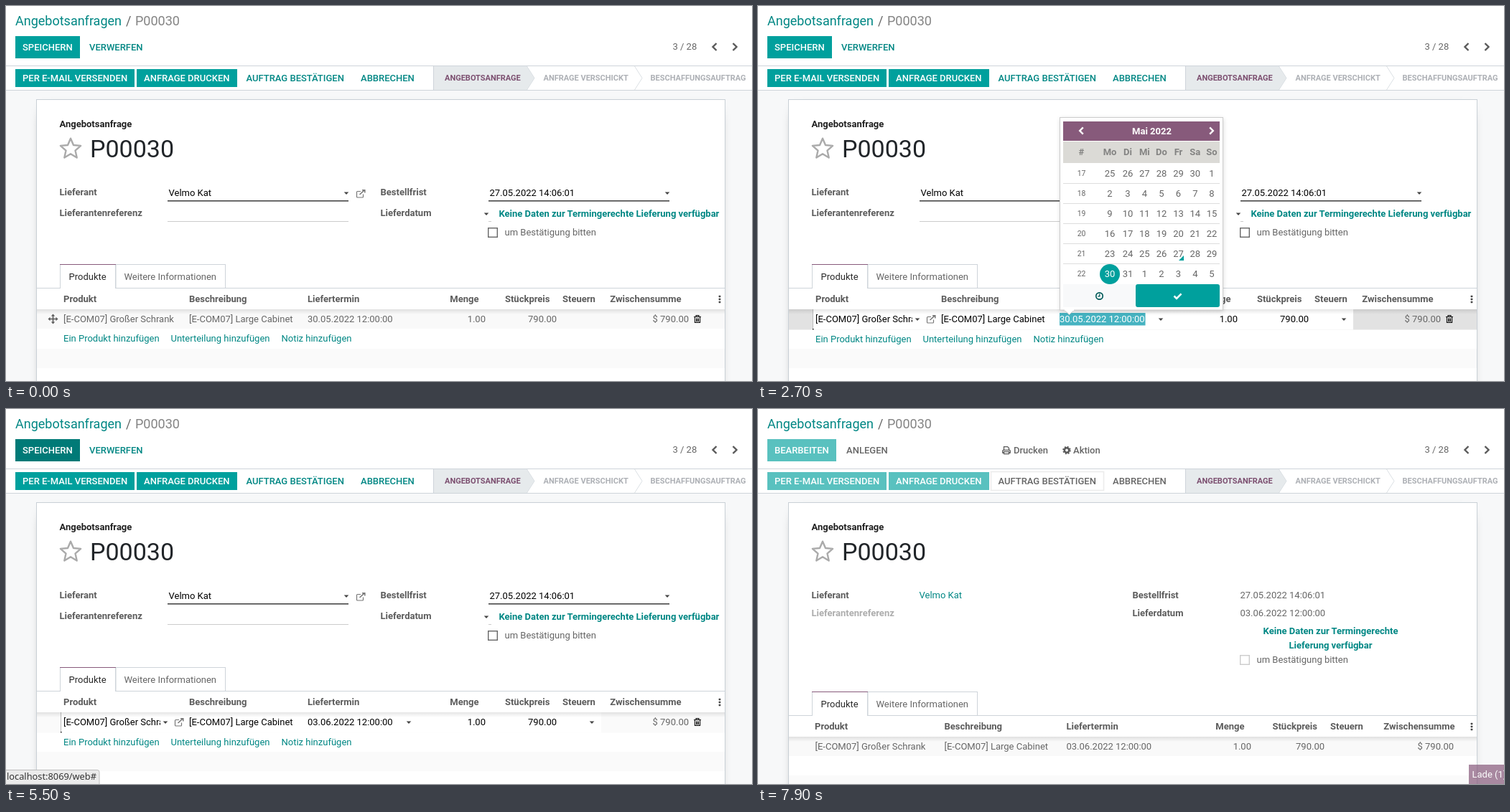
Recreate the animation shown at these times as an HTML page. Size 1039x523 px, loop 8 s.

```html
<!DOCTYPE html>
<html lang="de">
<head>
<meta charset="utf-8">
<title>Angebotsanfrage</title>
<style>
  html, body { margin: 0; width: 100%; height: 100%; overflow: hidden; background: #fff; }
  svg { display: block; }
  text { font: 13px Roboto, sans-serif; fill: #666; white-space: pre; }
  .bold { font-weight: 700; }
  .label { font-weight: 700; fill: #5c5c5c; }
  .btn { font-weight: 500; }
  .end { text-anchor: end; }
  .mid { text-anchor: middle; }
  .link { fill: #008784; }
  .white { fill: #fff; }
  .black { fill: #000; }
  .muted { fill: #adadad; }
  .crumb { font-size: 18px; }
  .title { font-size: 34px; fill: #212529; }
  .stage { font-size: 11px; font-weight: 700; fill: #adb0b5; }
  .active { fill: #7c4f70; }
  .tip { font-size: 11.375px; fill: #484848; }
  .week { font-size: 10.4px; }
  .url { font: 12.8px "Noto Sans", sans-serif; fill: #333; }
</style>
</head>
<body>
<svg id="view" width="1039" height="523" viewBox="0 0 1039 523"></svg>
<script>
const LOOP = 8000;
const TEAL = '#00a09d', DARK = '#007a77', PALE = '#59c1bf', LINE = '#ced4da', GREY = '#5a5a5a', PURPLE = '#875a7b';

// Drawing helpers
const text = (x, y, s, cls = '') => `<text x="${x}" y="${y}" class="${cls}">${s}</text>`;
const rect = (x, y, w, h, fill, more = '') => `<rect x="${x}" y="${y}" width="${w}" height="${h}" fill="${fill}" ${more}/>`;
const frame = (x, y, w, h, color, width = 1, fill = 'none') => rect(x, y, w, h, fill, `stroke="${color}" stroke-width="${width}"`);
const line = (d, color, width = 1, fill = 'none') => `<path d="${d}" stroke="${color}" stroke-width="${width}" fill="${fill}"/>`;
const shape = (d, fill) => `<path d="${d}" fill="${fill}"/>`;
const caret = (x, y) => shape(`M${x - 3.3} ${y - 1.5}h6.6l-3.3 3.4z`, '#444');
const button = (x, y, w, h, s, fill) => rect(x, y, w, h, fill) + text(x + 10, y + h / 2 + 4.5, s, 'btn white');

// Icons
const external = (x, y) =>
  line(`M${x + 6} ${y + 2.5}h-4.5q-1 0-1 1v6.5q0 1 1 1h7q1 0 1-1v-3.5`, '#777', 1.2) +
  line(`M${x + 4.5} ${y + 7}l7-6.4M${x + 8} ${y + .7}h3.8v3.8`, '#777', 1.5);
const chevron = (x, y, dir, color, size = 5) =>
  line(`M${x - dir * size / 2} ${y - size}l${dir * size} ${size}l${-dir * size} ${size}`, color, 2.4);
const trash = (x, y) =>
  line(`M${x} ${y + 2.5}h10M${x + 3} ${y + 2}v-1.4h4v1.4M${x + 1.4} ${y + 3}v7.4h7.2v-7.4M${x + 3.5} ${y + 4.5}v4.5m1.5-4.5v4.5m1.5-4.5v4.5`, '#111', 1.1);
const move = (x, y) =>
  line(`M${x - 5} ${y}h10M${x} ${y - 5}v10`, GREY, 1.6) +
  [0, 90, 180, 270].map(a => `<path d="M0-7l2.7 3h-5.4z" fill="${GREY}" transform="translate(${x} ${y}) rotate(${a})"/>`).join('');
const dots = y => [-4, 0, 4].map(d => rect(992.7, y + d - 1.3, 2.6, 2.6, '#444', 'rx=".6"')).join('');
const printer = (x, y) =>
  line(`M${x + 2.5} ${y + 5}v-4.4h5l2 2v2.4M${x + 2.5} ${y + 9}h-1.8v-2.6q0-1 1-1h8.6q1 0 1 1v2.6h-1.8M${x + 2.5} ${y + 7.6}h7v3h-7z`, GREY, 1.3);
const gear = (x, y) =>
  `<circle cx="${x}" cy="${y}" r="3.2" fill="none" stroke="${GREY}" stroke-width="2.6"/>` +
  `<circle cx="${x}" cy="${y}" r="4.7" fill="none" stroke="${GREY}" stroke-width="2.2" stroke-dasharray="1.85"/>`;
const star = (cx, cy, r) => {
  const points = [...Array(10).keys()].map(i => {
    const a = (i * 36 - 90) * Math.PI / 180, d = i % 2 ? r * .46 : r;
    return `${(cx + d * Math.cos(a)).toFixed(1)},${(cy + d * Math.sin(a)).toFixed(1)}`;
  });
  return `<polygon points="${points.join(' ')}" fill="none" stroke="#aaa" stroke-width="2.4" stroke-linejoin="round"/>`;
};

// Shared page parts
const page = () =>
  rect(0, 118, 1039, 405, '#f7f8f9') +
  rect(57, 150, 929, 600, '#000', 'style="filter:blur(10px)"') +
  frame(42.5, 130.5, 959, 600, '#c9d0d6', 1, '#fff') +
  rect(0, 0, 1039, 118, '#fff') + rect(0, 83, 1039, 1, LINE) + rect(0, 117, 1039, 1, LINE) +
  text(13, 27, 'Angebotsanfragen', 'crumb link') + text(167, 27, '/', 'crumb') +
  `<g opacity=".8">${text(180, 27, 'P00030', 'crumb')}</g>` +
  text(928.5, 61, '3 / 28') + chevron(987, 57, -1, GREY) + chevron(1015, 57, 1, GREY) +
  shape('M595 84H725.5L736 100.5L725.5 117H595z', '#e6eaec') + rect(595, 84, 1, 33, LINE) +
  line('M725.5 84L736 100.5L725.5 117M875.5 84L886 100.5L875.5 117', '#dbe0e4') +
  text(611, 104, 'ANGEBOTSANFRAGE', 'stage active') +
  text(748.5, 104, 'ANFRAGE VERSCHICKT', 'stage') + text(897.5, 104, 'BESCHAFFUNGSAUFTRAG', 'stage') +
  `<g style="filter:brightness(.35)">${text(74.5, 169, 'Angebotsanfrage', 'label')}</g>` +
  star(90, 199.5, 14.8) + text(117, 211, 'P00030', 'title') +
  text(74.5, 264, 'Lieferant', 'label') + text(521.5, 264, 'Bestellfrist', 'label');

const actions = disabled => {
  const fill = disabled ? PALE : TEAL, cls = disabled ? 'btn' : 'btn link';
  return button(13, 88, 166, 25, 'PER E-MAIL VERSENDEN', fill) + button(182, 88, 140, 25, 'ANFRAGE DRUCKEN', fill) +
    text(334.5, 105, 'AUFTRAG BESTÄTIGEN', cls) + text(494, 105, 'ABBRECHEN', cls);
};

const tabs = y =>
  rect(43, y + 33, 958, 1, LINE) + frame(153, y + .5, 152.5, 33, LINE) +
  rect(75, y, 78, 34, '#fff') + line(`M75.5 ${y + 34}V${y}M152.5 ${y}V${y + 34}`, LINE) + rect(75, y, 78, 1, PURPLE) +
  `<g style="filter:brightness(.4)">${text(87.5, y + 22, 'Produkte')}</g>` + text(164.5, y + 22, 'Weitere Informationen');

const head = (y, x) =>
  ['Produkt', 'Beschreibung', 'Liefertermin', 'Menge', 'Stückpreis', 'Steuern', 'Zwischensumme']
    .map((s, i) => text(x[i], y, s, 'label' + ([3, 4, 6].includes(i) ? ' end' : ''))).join('') + dots(y - 4);

const rowShade = y => rect(43, y, 958, 7, 'url(#shade)');
const editColumns = [80, 255, 420, 658.5, 757.5, 775, 940.5];
const addLinks = y =>
  text(80, y, 'Ein Produkt hinzufügen', 'link') + text(229.5, y, 'Unterteilung hinzufügen', 'link') +
  text(383.5, y, 'Notiz hinzufügen', 'link');

const editForm = () =>
  text(116, 62, 'VERWERFEN', 'btn link') +
  text(226.5, 265, 'Velmo Kat', 'black') + rect(225, 271, 252, 1.6, '#484848') + caret(474, 261) + external(488, 256) +
  text(74.5, 293, 'Lieferantenreferenz', 'label') + rect(225, 300, 252, 1, '#ccc') +
  text(673.5, 265, '27.05.2022 14:06:01', 'black') + rect(672, 271, 252, 1.6, '#484848') + caret(921, 261) +
  text(521.5, 293, 'Lieferdatum', 'label') + caret(669, 290) + rect(672, 300, 4, 1, '#ccc') +
  text(686.5, 294, 'Keine Daten zur Termingerechte Lieferung verfügbar', 'bold link') +
  frame(671.7, 309.7, 12.6, 12.6, '#666', 1.4) + text(694.5, 320, 'um Bestätigung bitten') +
  tabs(360) + head(413, editColumns) + rect(43, 478, 958, 27, '#fafafa');

const viewRow = fill =>
  rect(43, 423, 958, 27, fill) + rowShade(423) + move(65.5, 436.5) +
  text(80, 441, '[E-COM07] Großer Schrank') + text(255, 441, '[E-COM07] Large Cabinet') +
  text(420, 441, '30.05.2022 12:00:00') + text(668, 441, '1.00', 'end') + text(767, 441, '790.00', 'end') +
  text(951, 441, '$ 790.00', 'end') + trash(958, 431) + addLinks(468);

const inputRow = fill =>
  rect(43, 423, 958, 28.5, fill) + rect(77, 423, 752, 28.5, '#fff') + rect(76, 423, 1, 28, '#bbb') +
  rect(76, 450, 1.5, 1.5, '#222') + rowShade(423) +
  text(80, 441, '[E-COM07] Großer Schrank', 'black') + rect(215, 430, 22, 18, '#fff') +
  caret(222, 437) + external(235, 431) + text(255, 441, '[E-COM07] Large Cabinet', 'black') +
  caret(561, 437) + text(668, 441, '1.00', 'end black') + text(767, 441, '790.00', 'end black') + caret(816, 437) +
  text(951, 441, '$ 790.00', 'end') + trash(958, 431) + addLinks(469);

const readForm = () =>
  printer(340, 52) + text(356, 62, 'Drucken', 'btn') + gear(430, 57.5) + text(439, 62, 'Aktion', 'btn') +
  text(224.5, 264, 'Velmo Kat', 'link') + text(74.5, 289, 'Lieferantenreferenz', 'bold muted') +
  text(671.5, 264, '27.05.2022 14:06:01') + text(521.5, 289, 'Lieferdatum', 'label') + text(671.5, 289, '03.06.2022 12:00:00') +
  text(797.5, 314, 'Keine Daten zur Termingerechte', 'bold link mid') + text(797.5, 334, 'Lieferung verfügbar', 'bold link mid') +
  frame(671.7, 343.7, 12.6, 12.6, '#ccc', 1.4) + text(694.5, 354, 'um Bestätigung bitten') +
  tabs(394) + head(447, [79, 259.5, 429.5, 677.5, 779, 797, 970.5]) +
  rect(43, 457, 958, 27, '#f9f9f9') + rowShade(457) + rect(43, 511, 958, 12, '#fafafa') +
  text(79.5, 475, '[E-COM07] Großer Schrank') + text(259.5, 475, '[E-COM07] Large Cabinet') +
  text(429.5, 475, '03.06.2022 12:00:00') + text(687, 475, '1.00', 'end') +
  text(789, 475, '790.00', 'end') + text(969, 475, '$ 790.00', 'end');

// Pop-ups
const tooltip = () => {
  const rows = [['Feld', 'order_line'], ['Objekt', 'purchase.order'], ['Typ', 'one2many'],
    ['Widget', 'One2many (section_and_note_one2many)'], ['Kontext', `{'default_state': 'draft'}`], ['Domäne', '[]'],
    ['Modifikatoren', '{"readonly":[["state","in",["done","cancel"]]]}'], ['Bei Änderung', '1'], ['Relation', 'purchase.order.line']];
  return frame(359.5, 167.5, 324.5, 212, '#888', 1, '#fff') +
    line('M517 379.5l5.5 4.5l5.5-4.5', '#888', 1, '#fff') + rect(518, 378.5, 9, 1.4, '#fff') +
    rect(365, 173, 313, 27, '#f4f4f4') + text(373, 190, 'Auftragszeilen', 'tip bold') +
    rows.map(([key, value], i) => {
      const y = Math.round(221 + 17.5 * i);
      return `<circle cx="380" cy="${y - 3.5}" r="1.7" fill="none" stroke="#777" stroke-width=".8"/>` +
        text(388, y, `<tspan class="bold">${key}:</tspan> ${value}`, 'tip');
    }).join('');
};

const dayX = [490, 515, 538.3, 562, 585.5, 608.8, 632];
const cell = (i, fill, r) => {
  const col = i % 7, w = col ? 23.4 : 28;
  return rect(dayX[col] - w / 2, 219.5 + 28 * Math.floor(i / 7) + .5, w, 28, fill, `rx="${r}"`);
};
const calendar = (title, month, first, week, selected) => {
  let s = rect(421, 157, 227, 269, '#000', 'opacity=".16" style="filter:blur(3px)"') +
    line('M426 423.5l7.5 7l7.5-7', '#ccc', 1, '#fff') +
    frame(420.5, 155.5, 227, 268.5, '#ccc', 1, '#fff') + rect(427, 423, 13, 2, '#fff') +
    rect(425, 161, 218, 27, PURPLE) + text(548.5, 179, title, 'bold white mid') +
    chevron(450.5, 174, -1, '#fff', 4.6) + chevron(631.5, 174, 1, '#fff', 4.6) +
    rect(425, 189, 218, 30, '#dbdad6');
  ['#', 'Mo', 'Di', 'Mi', 'Do', 'Fr', 'Sa', 'So'].forEach((d, i) =>
    s += `<g opacity=".75">${text(i ? dayX[i - 1] : 450.5, 208, d, 'bold mid')}</g>`);
  s += cell(selected, TEAL, 14);
  for (let i = 0; i < 42; i++) {
    const row = Math.floor(i / 7), y = 238 + 28 * row;
    if (i % 7 === 0) {
      s += text(450.5, y - 1, week + row, 'week mid');
      if (row) s += rect(425, 219 + 28 * row, 218, 1, '#ddd');
    }
    s += text(dayX[i % 7], y, new Date(2022, month, first + i).getDate(), i === selected ? 'mid white' : 'mid');
  }
  return s;
};
const calendarFoot = (clock, check) =>
  rect(425, 388, 101, 32, '#f8f9fa') + rect(526, 388, 117, 32, check, 'rx="3"') +
  `<circle cx="475.5" cy="404.5" r="4.7" fill="none" stroke="${clock}" stroke-width="1.7"/>` +
  line('M475.8 401.5v3.4h-2.6', clock, 1.3) + line('M579.5 404.5l3.5 3.4l6.5-6.5', '#fff', 2.6);

const statusUrl = () =>
  `<path d="M-1 503.5H127q3 0 3 3V524H-1z" fill="#ebebeb" stroke="#bdbdbd"/>` + text(1, 517, 'localhost:8069/web#', 'url');
const loading = () => rect(990, 496, 49, 27, PURPLE) + text(994.5, 514, 'Lade (1)', 'white');

// Timeline: each layer has a rule giving its opacity at time t
const during = (...spans) => t => +spans.some(([a, b]) => t >= a && t < b);
const keys = (...stops) => t => stops.reduce((value, [at, v]) => t >= at ? v : value, 0);
const saved = 5800;
const layers = [
  [() => 1, page()],
  [during([0, 5600], [saved, 7500]), actions(false)],
  [during([5600, saved], [7500, LOOP]), actions(true)],
  [during([0, saved]), editForm()],
  [during([0, 5400]), button(13, 42, 90, 31, 'SPEICHERN', TEAL)],
  [during([5400, 5600]), button(13, 42, 90, 31, 'SPEICHERN', DARK)],
  [during([5600, saved]), button(13, 42, 90, 31, 'SPEICHERN', PALE)],
  [during([0, 1300]), viewRow('#f9f9f9')],
  [during([1300, 1400]), viewRow('#e2e2e2')],
  [during([1400, 4500]), inputRow('#e2e2e2')],
  [during([4500, saved]), inputRow('#fafafa')],
  [during([1400, 3800]), rect(420, 428, 119.5, 17.5, '#46b3c1') + text(420, 441, '30.05.2022 12:00:00', 'white')],
  [during([3800, saved]), text(420, 441, '03.06.2022 12:00:00', 'black')],
  [during([3800, 4200]), rect(539, 429, 1, 16, '#000')],
  [during([saved, LOOP]), readForm()],
  [during([saved, 7500]), button(13, 42, 96, 31, 'BEARBEITEN', TEAL) + text(123, 62, 'ANLEGEN', 'btn link')],
  [during([7500, LOOP]), button(13, 42, 96, 31, 'BEARBEITEN', PALE) + text(123, 62, 'ANLEGEN', 'btn') +
    frame(324.5, 87.5, 157, 26, '#ececec', 1.6)],
  [during([saved, 7400]), frame(12, 87, 168, 27, '#66c6c4', 2)],
  [keys([6900, .5], [7000, 1], [7500, 0]), rect(325, 88, 156, 25, '#ececec') + text(334.5, 105, 'AUFTRAG BESTÄTIGEN', 'btn link')],
  [keys([1700, .2], [1800, .55], [1900, 1], [2000, .4], [2100, 0]), tooltip()],
  [during([2000, 3800]), calendar('Mai 2022', 3, 25, 17, 35) + shape('M593 348v7h-7z', TEAL)],
  ...[[36, 2800, 2900], [37, 2900, 3000], [38, 3000, 3500], [39, 3500, 3800]].map(([i, from, to]) =>
    [during([from, to]), cell(i, '#eee', 3) + text(dayX[i % 7], 378, i - 35, 'mid').replace('>1<', '>31<').replace(/>([23])</, (m, d) => `>${d - 1}<`).replace('>4<', '>3<')]),
  [during([3800, 4200]), calendar('Juni 2022', 4, 30, 22, 4)],
  [during([2000, 2800]), calendarFoot('#005a58', TEAL)],
  [during([2800, 3900]), calendarFoot(TEAL, TEAL)],
  [during([3900, 4200]), calendarFoot(TEAL, DARK)],
  [during([4200, 5600]), statusUrl()],
  [keys([4300, 1], [4400, .8], [4500, .5], [4600, .2], [4700, 0], [5700, 1], [5800, .7], [5900, .3], [6000, .05], [6900, 0],
    [7600, 1], [7800, .9], [7900, .7]), loading()],
];

const view = document.getElementById('view');
view.innerHTML = `<defs><linearGradient id="shade" x2="0" y2="1"><stop stop-opacity=".1"/><stop offset="1" stop-opacity="0"/></linearGradient></defs>` +
  layers.map(([, svg]) => `<g>${svg}</g>`).join('');
const groups = [...view.children].slice(1);

function draw(now) {
  const t = now % LOOP;
  groups.forEach((g, i) => {
    const opacity = layers[i][0](t);
    g.style.display = opacity ? '' : 'none';
    g.style.opacity = opacity;
  });
  requestAnimationFrame(draw);
}
draw(performance.now());
</script>
</body>
</html>
```
